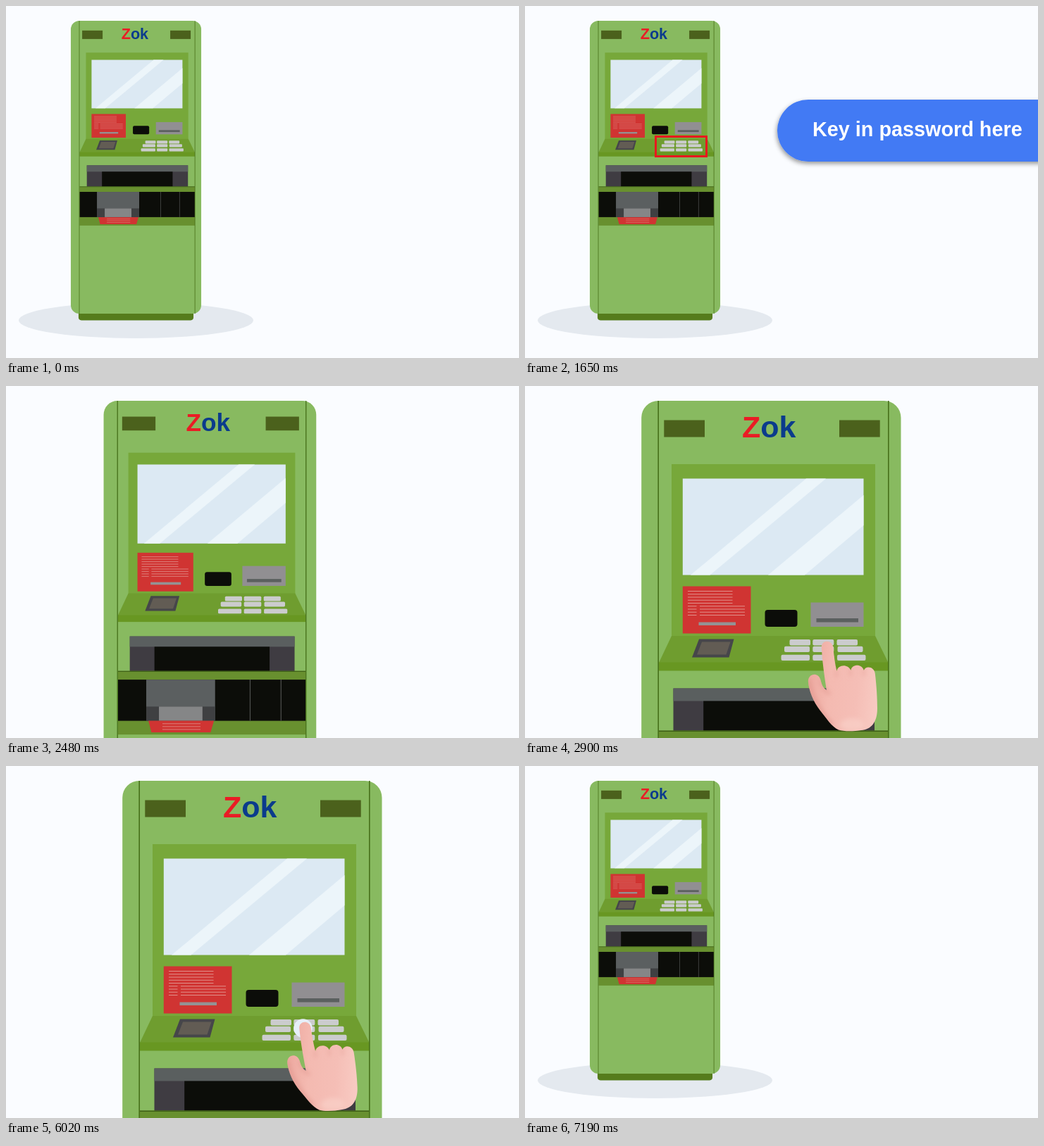
These frames come from a looping animation (728 px wide and 500 px high, 7.22 s). An HTML page:

```html
<!DOCTYPE html>
<html lang="en">
<head>
<meta charset="utf-8">
<title>Cash machine password</title>
<style>
  html, body { margin: 0; width: 100%; height: 100%; overflow: hidden; background: #fafcff; }
  svg { display: block; width: 728px; height: 500px; }
  text { font-family: "Liberation Sans", Arial, sans-serif; font-weight: bold; }
</style>
</head>
<body>
<svg viewBox="0 0 728 500">
  <defs>
    <linearGradient id="skin" gradientUnits="userSpaceOnUse" x1="402" y1="430" x2="500" y2="440">
      <stop offset="0" stop-color="#eda9a0"/>
      <stop offset=".3" stop-color="#f4bab1"/>
      <stop offset=".7" stop-color="#f5beb6"/>
      <stop offset="1" stop-color="#f8cac2"/>
    </linearGradient>
    <filter id="soft" x="-50%" y="-50%" width="200%" height="200%"><feGaussianBlur stdDeviation="3"/></filter>
    <filter id="shadow" x="-10%" y="-20%" width="120%" height="150%">
      <feDropShadow dx="-1" dy="3" stdDeviation="3" flood-opacity=".4"/>
    </filter>
    <clipPath id="handClip"><use href="#handShape"/></clipPath>
  </defs>

  <g id="scene">
    <ellipse cx="349.4" cy="867.7" rx="331.3" ry="50.7" fill="#e4e9ef"/>
    <path d="M187 845H511.6V859.500Q511.6 867.5 503.6 867.5H195Q187 867.5 187 859.500Z" fill="#557c1c"/>
    <rect x="165.200" y="21" width="368.300" height="828" rx="24" fill="#88ba60"/>

    <g fill="#4b611c">
      <rect x="197.300" y="48.500" width="57.700" height="24"/>
      <rect x="446" y="48.500" width="57.700" height="24"/>
    </g>
    <text x="308" y="73" font-size="43" fill="#0b3b8c"><tspan fill="#ea1c25">Z</tspan>ok</text>

    <rect x="208" y="111" width="289" height="245" fill="#77a83a"/>
    <rect x="223.800" y="131.500" width="256.700" height="137" fill="#dce9f3"/>
    <path d="M399 131.500H427L262.500 268.500H235ZM480.500 155V198L397 268.500H345Z" fill="#ecf5fa"/>

    <rect x="223.800" y="284.500" width="96.700" height="67" fill="#d03432"/>
    <g id="signLines" fill="none" stroke="#e08f89" stroke-width="1"></g>
    <rect x="246.500" y="335.500" width="52.500" height="4.500" fill="#949294"/>

    <rect x="340.500" y="318" width="46" height="24" rx="4" fill="#0c0d09"/>
    <rect x="405.500" y="307.500" width="75" height="34.500" fill="#918f92"/>
    <rect x="413.500" y="330" width="59.500" height="5.500" fill="#5b605f"/>

    <path d="M208 355H497L515.500 393H190Z" fill="#6f9d2f"/>
    <rect x="190" y="392.500" width="325.500" height="12" fill="#689722"/>
    <path d="M247 359.500H296.500L289.500 385.500H237Z" fill="#46464a"/>
    <path d="M251 363.500H291.500L285.500 381.500H244Z" fill="#625c54"/>
    <g id="keys" fill="#cbcccd"></g>

    <rect x="210.500" y="429.500" width="285.500" height="61" fill="#3f3c42"/>
    <rect x="210.500" y="429.500" width="285.500" height="18" fill="#5a5f5f"/>
    <rect x="253.200" y="447.500" width="199.500" height="43" fill="#0c0d09"/>

    <rect x="190" y="489.500" width="325.500" height="110.300" fill="#68902f"/>
    <rect x="190" y="489.500" width="325.500" height="1.500" fill="#3f6017"/>
    <rect x="190" y="504.600" width="325.500" height="71.400" fill="#0c0d09"/>
    <path d="M419 504.600V576M472.500 504.600V576" stroke="#4d4f4e" stroke-width="1.500"/>
    <rect x="239" y="504.600" width="119.300" height="71.400" fill="#5b5f60"/>
    <rect x="239" y="551.300" width="119.300" height="24.700" fill="#3f4042"/>
    <rect x="261" y="551.300" width="75.400" height="24.700" fill="#858687"/>
    <path d="M242.800 576H356.300L350.500 596H248Z" fill="#d03432"/>
    <path d="M267 581H333M267 586H333M267 591H333" stroke="#e08f89"/>
    <path d="M189.200 21V849M515.800 21V849" stroke="#47701a" stroke-width="1.600"/>

    <circle id="ripple" cx="421.500" cy="372.500" fill="#e6eff9"/>
    <g id="hand">
      <path id="handShape" fill="url(#skin)" d="M421 372C420 360 436 359.500 437.500 371C438.500 383 440 394 442.500 405
        C444 396 458 394 462.500 404C464 395 478 394 481 404C484 396.500 496 399 497 409
        C499 427 500 442 500 458C500 478 491 488 477 489C467 490.500 453 491 445 488.500
        C435 484 428 472 419 461C409 448 403 433 402 420C401.500 408 416 405.500 419.500 417
        C421 424 423 429 428 432C425 412 422 392 421 372Z"/>
      <g clip-path="url(#handClip)" fill="none" filter="url(#soft)">
        <path d="M402 417Q406 448 436 482" stroke="#df938a" stroke-width="5" opacity=".7"/>
        <path d="M420 417Q422 431 433 438" stroke="#de9188" stroke-width="4" opacity=".6"/>
        <path d="M442 403V414M462 402V412M481 402V412" stroke="#e39b92" stroke-width="3" opacity=".6"/>
        <ellipse cx="464" cy="481" rx="17" ry="9" fill="#fad0c8" opacity=".7"/>
      </g>
    </g>
  </g>

  <rect id="frame" x="185.500" y="185.500" width="72" height="28" fill="none" stroke="#e8181e" stroke-width="3"/>
  <g id="banner">
    <rect x="358" y="133" width="460" height="88" rx="44" fill="#427af4" filter="url(#shadow)"/>
    <text x="408" y="185" font-size="28.800" fill="#fff">Key in password here</text>
  </g>
</svg>
<script>
  const LOOP = 7220, TICK = 30, ZOOM = 1.99;
  const el = id => document.getElementById(id);
  const show = (id, on) => el(id).setAttribute('visibility', on ? 'visible' : 'hidden');

  // Progress 0..1 in n equal hard steps, the first one taken at `start`.
  const steps = (t, start, n) =>
    Math.min(n, Math.max(0, Math.floor((t - start) / TICK) + 1)) / n;

  const keyRows = [
    [360, 375.5, 29.5, 442.5],
    [369.7, 368, 36, 443.5],
    [381.7, 363.5, 40.5, 443]
  ];
  el('keys').innerHTML = keyRows.map(([y, left, w, right]) =>
    [[left, w], [408.3, 30], [right, w]].map(([x, width]) =>
      `<rect x="${x}" y="${y}" width="${width}" height="8.4" rx="2"/>`).join('')).join('');

  let lines = '';
  for (let i = 0; i < 9; i++) {
    const y = 291.5 + i * 4.25;
    lines += i < 5 ? `M231 ${y}H294.5` : `M231 ${y}H243.5M248 ${y}H312`;
  }
  el('signLines').innerHTML = `<path d="${lines}"/>`;

  function draw(t) {
    const zoom = steps(t, 2300, 11) - steps(t, 6890, 11);
    const k = (1 + (ZOOM - 1) * zoom) / ZOOM;
    el('scene').setAttribute('transform', `translate(18 21) scale(${k}) translate(-18 -21)`);

    const slide = steps(t, 30, 5) - steps(t, 2150, 5);
    show('banner', slide > 0);
    el('banner').setAttribute('transform', `translate(${380 * (1 - slide)} 0)`);
    show('frame', t >= 150 && t < 2150 && Math.floor((t - 150) / 250) % 2 === 0);

    // Two identical taps, each snapping back after a pause.
    const tap = t - (t < 4730 ? 2900 : 5000);
    const handOn = t >= 2630 && t < 6830;
    show('hand', handOn);
    el('hand').setAttribute('transform', `rotate(${-2.3 * steps(tap, 0, 25)} 450 490)`);

    const wave = steps(tap, 750, 21);
    show('ripple', handOn && wave > 0 && wave < 1);
    el('ripple').setAttribute('r', 15.5 * (1 - (1 - wave) ** 3));
    el('ripple').setAttribute('opacity', Math.min(1, 2 * (1 - wave)));
  }

  function tick() {
    draw(performance.now() % LOOP);
    requestAnimationFrame(tick);
  }
  tick();
</script>
</body>
</html>
```
